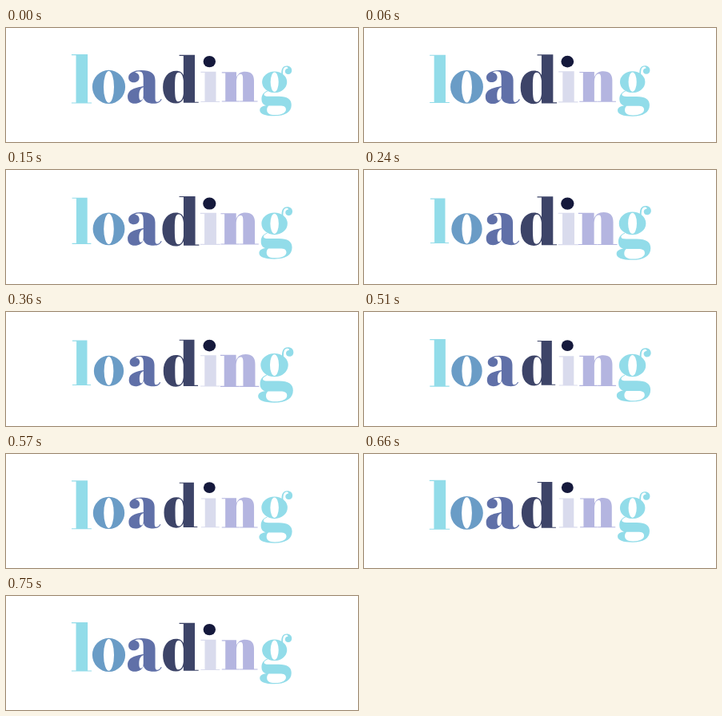
Recreate the animation shown at these times as an HTML page with a canvas. Size 440 px wide and 143 px high, loop 780 ms.

```html
<!DOCTYPE html>
<html lang="en">
<head>
<meta charset="utf-8">
<title>loading</title>
<style>
  html, body { margin: 0; width: 100%; height: 100%; overflow: hidden; background: #fff; }
  canvas { display: block; width: 440px; height: 143px; }
</style>
</head>
<body>
<canvas id="stage" role="img" aria-label="loading"></canvas>
<script>
const WIDTH = 440, HEIGHT = 143;
const STEP = 30, STEPS = 26;     // the last step repeats the first pose
const CYCLE = STEP * (STEPS - 1);
const SWELL = 0.05;              // scale change either side of the mean
const FIRST_PEAK = -75, PEAK_DELAY = 73;

const canvas = document.getElementById('stage');
const ctx = canvas.getContext('2d');
const ratio = window.devicePixelRatio || 1;
canvas.width = WIDTH * ratio;
canvas.height = HEIGHT * ratio;

const outline = d => new Path2D(d);

function oval(x, y, rx, ry, holeX, holeY) {
  const path = new Path2D();
  path.ellipse(x, y, rx, ry, 0, 0, Math.PI * 2);
  if (holeX) {
    path.moveTo(x + holeX, y);
    path.ellipse(x, y, holeX, holeY, 0, 0, Math.PI * 2);
  }
  return path;
}

// order: place in the wave; x, y: centre of the scaling
const parts = [
  { order: 0, x: 94.5, y: 63.8, color: '#92dce9', shapes: [
    outline('M82.4 34.3H101.8V92.3H106.6V93.4H82.4V92.3H87.8V35.4H82.4Z')
  ] },
  { order: 1, x: 128.5, y: 73.9, color: '#6a9cc6', shapes: [
    oval(128.5, 73.9, 19.6, 20.1, 6.2, 18.9)
  ] },
  { order: 2, x: 173.5, y: 74, color: '#6070a8', shapes: [
    outline(`M153.9 62.6C153.9 57.2 160.5 53.9 169.3 53.9C180.8 53.9 186 58 186 66V88
      C186 90.8 186.8 92 188.3 92C190.4 92 191.8 90.5 192.9 88.4L193.9 89
      C192.1 92.4 189.4 94 184.2 94C177 94 172.8 91.5 172 87C170.3 91.8 166.4 94 161.5 94
      C156 94 152.9 91 152.9 85.8C152.9 76.5 163 74.6 171.8 73V64C171.8 58 170.6 55.2 166.8 55.2
      C164.6 55.2 162.8 55.6 161.4 56.5C164.8 57 166.9 59.2 166.9 62.4
      C166.9 66 164.2 68.4 160.4 68.4C156.6 68.4 153.9 66.2 153.9 62.6Z
      M171.8 74.3C168.4 75.5 166.6 78.5 166.6 84.5C166.6 88.3 167.2 90 168.8 90
      C170.5 90 171.8 88 171.8 84Z`)
  ] },
  { order: 3, x: 218.3, y: 64, color: '#3d4468', shapes: [
    outline(`M216.6 34.4H235.7V92.2H240.3V93.3H221.8V88C220 92 217 94 212.6 94
      C203.2 94 196.5 86.5 196.5 74C196.5 61.5 203.5 53.9 212.8 53.9C217.4 53.9 220.3 56 221.8 59.3
      V35.5H216.6Z
      M221.8 66C221 59 218.8 56 216 56C212.2 56 211.2 60.5 211.2 73.5
      C211.2 87 212 91.8 215.7 91.8C219 91.8 221.2 88 221.8 82Z`)
  ] },
  { order: 4, x: 255.3, y: 73.8, color: '#d9dbed', shapes: [
    outline('M243.3 54.6H262.6V92.1H267.3V93.2H243.3V92.1H248.4V55.7H243.3Z')
  ] },
  { order: 4, x: 254.3, y: 42.1, color: '#15193c', shapes: [
    oval(254.3, 42.1, 7.8, 7.2)
  ] },
  { order: 5, x: 292.2, y: 73.6, color: '#b4b5e0', shapes: [
    outline(`M268.9 54.6H287.8V61.5C289.5 56.5 293.4 53.9 299.3 53.9
      C306.8 53.9 310.7 57.8 310.7 65.5V92.1H315.4V93.2H292.1V92.1H296.3V63.5
      C296.3 59 295.5 57.2 293.2 57.2C290 57.2 287.8 61.5 287.8 68V92.1H291.8V93.2H268.9V92.1
      H273.5V55.7H268.9Z`)
  ] },
  { order: 6, x: 337.2, y: 78.9, color: '#92dce9', shapes: [
    oval(335.6, 67.2, 16.4, 14, 5.3, 12.8),
    outline(`M344.8 57.8C344 50 346.5 45.9 351.6 45.9C356 45.9 358.3 48.5 358.3 51.8
      C358.3 55 356.3 56.9 353.6 56.9C351 56.9 349.4 55.3 349.4 53
      C349.4 50.8 351 49.4 353.3 49.2C353 47.8 352.2 47.3 351 47.3
      C347.5 47.3 346.2 51 346.6 57.8Z`),
    outline(`M326.5 79.6C323.2 81 321.8 82.4 321.8 83.8C321.8 85.5 323.8 86.2 328 86.2H341
      C352.5 86.2 357.8 90 357.8 97.5C357.8 107 349.5 112 335.5 112
      C323 112 316.2 109.3 316.2 104.5C316.2 101.2 319 99 324.5 98.3
      C320.5 97.2 318.5 94.3 318.5 89.8C318.5 84.5 321 81 326 78.8Z
      M328 98.6C326.3 100 325.6 101.7 325.6 104C325.6 108.3 329 110.7 336 110.7
      C345 110.7 350.6 108 350.6 103.5C350.6 100 348 98.6 342.5 98.6Z`)
  ] }
];

function drawPart({ order, x, y, color, shapes }, time) {
  const peak = FIRST_PEAK + order * PEAK_DELAY;
  const scale = 1 + SWELL * Math.cos((time - peak) / CYCLE * Math.PI * 2);
  ctx.save();
  ctx.translate(x, y);
  ctx.scale(scale, scale);
  ctx.translate(-x, -y);
  ctx.fillStyle = color;
  for (const shape of shapes) ctx.fill(shape, 'evenodd');
  ctx.restore();
}

const start = performance.now();

function draw() {
  const elapsed = performance.now() - start;
  const time = Math.floor(elapsed / STEP) % STEPS * STEP;
  ctx.setTransform(ratio, 0, 0, ratio, 0, 0);
  ctx.fillStyle = '#fff';
  ctx.fillRect(0, 0, WIDTH, HEIGHT);
  for (const part of parts) drawPart(part, time);
  requestAnimationFrame(draw);
}
draw();
</script>
</body>
</html>
```
